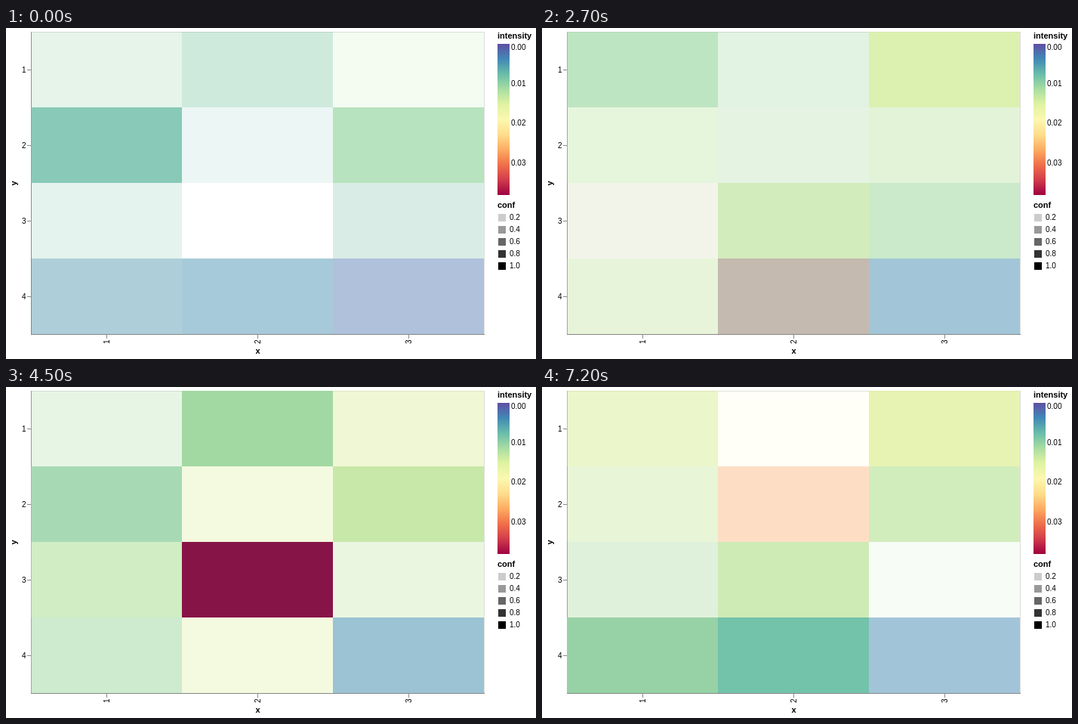
An HTML page for the animation above (8000 ms loop, 702x438 px).

```html
<!DOCTYPE html>
<html lang="en">
<head>
<meta charset="utf-8">
<title>Heatmap</title>
<style>
html, body { margin: 0; width: 100%; height: 100%; overflow: hidden; background: #fff; }
svg { display: block; width: 702px; height: 438px; }
text { font: 10px "Liberation Sans", Arial, sans-serif; fill: #000; }
.title { font-size: 11px; font-weight: bold; }
</style>
</head>
<body>
<svg id="chart" viewBox="0 0 702 438" xmlns="http://www.w3.org/2000/svg">
  <defs><linearGradient id="ramp" x1="0" y1="0" x2="0" y2="1"></linearGradient></defs>
</svg>
<script>
const NS = "http://www.w3.org/2000/svg";
const chart = document.getElementById("chart");
const LEFT = 33, TOP = 5, W = 600, H = 400, COLS = 3, ROWS = 4;
const CELL_W = W / COLS, CELL_H = H / ROWS;
const STEP = 900, LOOP = 8000;

const ramp = "5e4fa2 4288b5 69bda9 a9dda2 e0f3a1 fbf8b0 fedd8d fcac63 f0704a d13c4b 9e0142"
  .split(" ").map(rgb);

// Cell colours as seen on white, row by row
const grids = [
  "e6f4ea ceeadd f4fcf2 88c9b7 ecf6f4 b8e3be e4f3ee ffffff d9ede6 aecfd9 a6cad9 afc1db",
  "b0dfbb ddf0df dcf1ab f9fefb fdfefb ddf2cd e6f5e2 e4f3b3 dcf1d0 e1f2e5 e99da0 a4ccd6",
  "cdebc7 e7f5e8 dcf1b6 d1edbd cdeaca e7f5e3 fdf2f1 c4e6c6 b7e2c5 ecf7cf a1d7bf a0c1d9",
  "e7f5e5 a3d9a4 f0f7d4 a8dab5 f4fadf c7e9a9 d2edc3 881548 eaf6e0 ceebcf f4fadf 9bc3d4",
  "b3e0b7 e7f4d9 fefff6 8fd0a8 e6f4b9 fbfdea a0d8aa bbe3c6 dff1d2 a1d5cb abdbc3 78abc8",
  "ebf6ca fffff7 e6f4b4 e8f5d7 fddec4 d1edbc e0f1db ceebb5 f7fcf7 97d3a6 74c2ab a2c4d9"
].map(row => row.split(" ").map(rgb));

// Position among the grids at each step; halves lie between two grids
const steps = [0, 0.5, 1, 1.5, 2, 3, 3.5, 4, 5];

function rgb(hex) {
  return [0, 2, 4].map(i => parseInt(hex.slice(i, i + 2), 16));
}

function mix(a, b, k) {
  return a.map((v, i) => v + (b[i] - v) * k);
}

function add(tag, attrs, text, parent = chart) {
  const el = document.createElementNS(NS, tag);
  for (const key in attrs) el.setAttribute(key, attrs[key]);
  if (text !== undefined) el.textContent = text;
  parent.appendChild(el);
  return el;
}

function label(x, y, text, attrs = {}) {
  add("text", { x, y, ...attrs }, text);
}

function upright(x, y, text, attrs) {
  add("text", { transform: `translate(${x} ${y}) rotate(-90)`, ...attrs }, text);
}

function line(d) {
  add("path", { d, stroke: "#888", fill: "none" });
}

// Split a colour on white into a ramp colour and its opacity
function unblend(col) {
  const dark = col.map(v => 255 - v);
  let best = Infinity, alpha = 0;
  for (let k = 0; k <= 100; k++) {
    const i = Math.min(9, Math.floor(k / 10));
    const full = mix(ramp[i], ramp[i + 1], k / 10 - i).map(v => 255 - v);
    const dot = full.reduce((s, v, n) => s + v * dark[n], 0);
    const a = Math.min(1, dot / full.reduce((s, v) => s + v * v, 0));
    const err = full.reduce((s, v, n) => s + (v * a - dark[n]) ** 2, 0);
    if (err < best) { best = err; alpha = a; }
  }
  alpha = Math.max(alpha, ...dark.map(v => v / 255));
  const pure = dark.map(v => alpha ? Math.max(0, Math.round(255 - v / alpha)) : 255);
  return { fill: `rgb(${pure})`, alpha };
}

// Frame and axes
add("rect", { x: LEFT + 0.5, y: TOP + 0.5, width: W, height: H, fill: "none", stroke: "#ddd" });
line(`M33.5 5V406M33 405.5H634`);
for (let r = 0; r < ROWS; r++) {
  const y = TOP + (r + 0.5) * CELL_H + 0.5;
  line(`M28 ${y}H33`);
  label(26.5, y + 3, r + 1, { "text-anchor": "end" });
}
for (let c = 0; c < COLS; c++) {
  const x = LEFT + (c + 0.5) * CELL_W + 0.5;
  line(`M${x} 406V411`);
  upright(x + 3, 412.5, c + 1, { "text-anchor": "end" });
}
label(333.5, 431, "x", { class: "title", "text-anchor": "middle" });
upright(14, 205.5, "y", { class: "title", "text-anchor": "middle" });

// Legends
ramp.forEach((c, i) => add("stop", { offset: i / 10, "stop-color": `rgb(${c})` },
  undefined, document.getElementById("ramp")));
label(651, 14, "intensity", { class: "title" });
add("rect", { x: 651, y: 21, width: 16, height: 200, fill: "url(#ramp)" });
[29, 77, 129, 182].forEach((y, i) => label(669, y, "0.0" + i));
label(651, 238, "conf", { class: "title" });
for (let i = 1; i <= 5; i++) {
  const y = 235 + 16 * i;
  add("rect", { x: 652, y: y - 5, width: 10, height: 10, "fill-opacity": i / 5 });
  label(667, y + 3, (i / 5).toFixed(1));
}

const cells = grids[0].map((_, i) => add("rect", {
  x: LEFT + (i % COLS) * CELL_W, y: TOP + Math.floor(i / COLS) * CELL_H,
  width: CELL_W, height: CELL_H
}));

const states = steps.map(p => {
  const from = grids[Math.floor(p)], to = grids[Math.ceil(p)];
  return from.map((c, i) => unblend(mix(c, to[i], p % 1)));
});

let shown = -1;
function render(t) {
  const step = Math.min(steps.length - 1, Math.floor((t % LOOP) / STEP));
  if (step === shown) return;
  shown = step;
  cells.forEach((cell, i) => {
    const { fill, alpha } = states[step][i];
    cell.setAttribute("fill", fill);
    cell.setAttribute("fill-opacity", alpha);
  });
}

const start = performance.now();
function tick() {
  render(performance.now() - start);
  requestAnimationFrame(tick);
}
tick();
</script>
</body>
</html>
```
